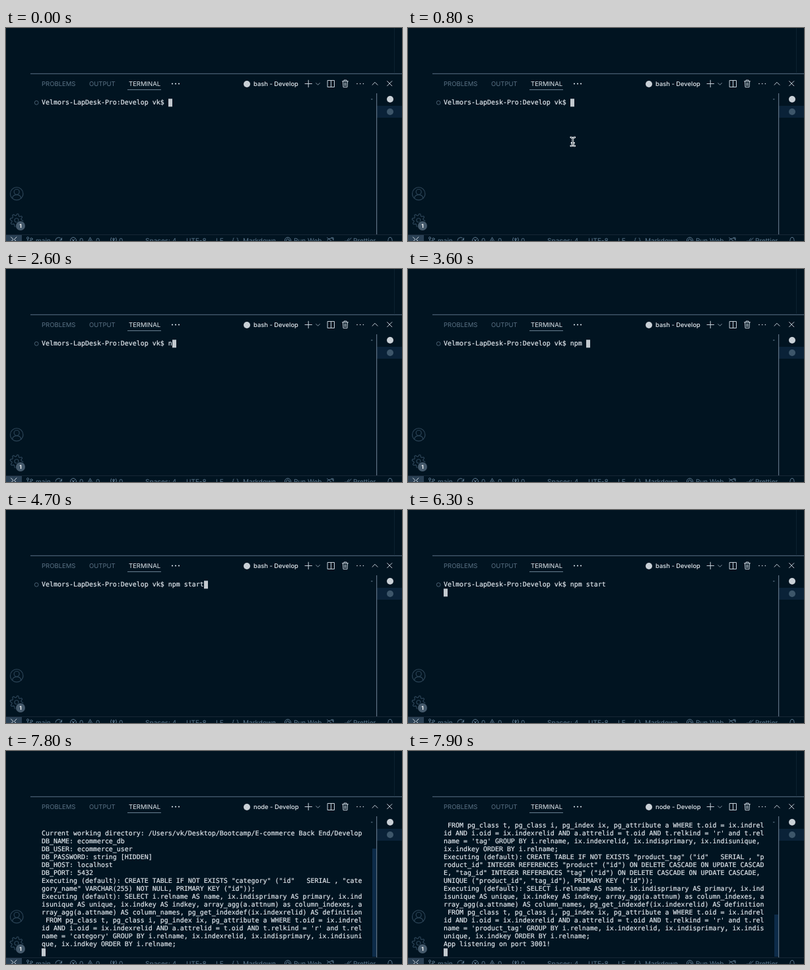
Recreate the animation shown at these times as an HTML page. Size 600 px wide and 323 px high, loop 8 s.

```html
<!DOCTYPE html>
<html lang="en">
<head>
<meta charset="utf-8">
<title>Terminal session</title>
<style>
  html, body { margin: 0; width: 100%; height: 100%; overflow: hidden; background: #011421; text-rendering: geometricPrecision; }
  svg { position: absolute; left: 0; top: 0; font-family: Inter, sans-serif; }
  .line { fill: none; stroke: currentColor; stroke-linecap: round; stroke-linejoin: round; }
  .tabs { font-size: 9.5px; }
  .status { font-size: 10px; color: #5c788e; }
  #screen {
    position: absolute; left: 54px; top: 108px; margin: 0; color: #e2e7ed;
    font: 9.966px/12px "DejaVu Sans Mono", monospace; font-variant-ligatures: none;
    -webkit-text-stroke: .2px #e2e7ed;
  }
</style>
</head>
<body>
<svg width="600" height="323" viewBox="0 0 600 323">
  <!-- panel frame -->
  <path d="M37 69.3H600" stroke="#5b7086"/>
  <path d="M588.5 0V69" stroke="#0c2231"/>
  <path d="M0 313.5H600" stroke="#172635"/>
  <rect x="562" y="118" width="38" height="18" fill="#0a2238"/>
  <path d="M561.7 99V313" stroke="#73879a"/>

  <!-- panel tabs -->
  <g class="tabs" fill="#5a7184">
    <text x="54" y="88">PROBLEMS</text>
    <text x="126" y="88">OUTPUT</text>
    <text x="186" y="88" fill="#e2e7ed">TERMINAL</text>
    <text id="title" x="375" y="88" font-size="9.4" font-weight="500" fill="#e2e7ed"></text>
  </g>
  <path d="M184 93.6H235" stroke="#6d8496"/>
  <g fill="#d8dfe8">
    <circle cx="252" cy="84.5" r="1.1"/><circle cx="257" cy="84.5" r="1.1"/><circle cx="262" cy="84.5" r="1.1"/>
    <circle cx="532" cy="84.5" r=".8"/><circle cx="536.7" cy="84.5" r=".8"/><circle cx="541.4" cy="84.5" r=".8"/>
  </g>
  <g fill="#c9d0d6">
    <circle cx="365" cy="85" r="5"/>
    <circle cx="582" cy="108" r="5"/>
    <circle cx="582" cy="127" r="5" fill="#3d566a"/>
  </g>
  <g class="line" color="#c8d1da">
    <path d="M453 84.5h10.5M458.2 79.2v10.5"/>
    <path d="M469.8 83.5l2.8 2.8 2.8-2.8" stroke="#8496a5"/>
    <path d="M487.5 79.5h10v10h-10zM492.5 79.5v10"/>
    <path d="M509.5 80.8h9M512 80.5v-1.5h4v1.5M510.5 81l.5 8.7h6l.5-8.7M513 83v4.5M515 83v4.5"/>
    <path d="M555 86.3l4-4 4 4M577.6 80.6l7.2 7.2M584.8 80.6l-7.2 7.2"/>
  </g>

  <!-- activity bar -->
  <g class="line" color="#2c4457" stroke-width="1.2">
    <circle cx="16.2" cy="251.2" r="9.7"/>
    <circle cx="16.2" cy="248.5" r="4"/>
    <path d="M9.6 258.2C10.5 251 22 251 22.8 258.2"/>
    <circle cx="16" cy="291.5" r="3"/>
    <path id="gear"/>
  </g>
  <circle cx="22" cy="300" r="7.8" fill="#011421"/>
  <circle cx="22" cy="300" r="7" fill="#44596b"/>
  <text x="22" y="303" font-size="8" font-weight="700" text-anchor="middle" fill="#fff">1</text>

  <!-- status bar -->
  <rect y="314" width="24" height="9" fill="#2a4054"/>
  <path class="line" color="#d0d8e0" d="M7.5 317l3.5 3.5-3.5 3.5M16 317l-3.5 3.5 3.5 3.5"/>
  <g class="status" fill="currentColor">
    <text x="45" y="326">main</text>
    <text x="111" y="326">0</text>
    <text x="136" y="326">0</text>
    <text x="171" y="326">0</text>
    <text x="211" y="326">Spaces: 4</text>
    <text x="273" y="326">UTF-8</text>
    <text x="318" y="326">LF</text>
    <text x="342" y="326">{ }</text>
    <text x="359" y="326">Markdown</text>
    <text x="436" y="326">Run Web</text>
    <text x="526" y="326">Prettier</text>
    <g class="line">
      <circle cx="33" cy="318.5" r="1.6"/><circle cx="38.5" cy="320" r="1.6"/><path d="M33 320v3M38 322l-5 2"/>
      <path d="M75 322a4.6 4.6 0 0 1 9-1M84.5 318.5v3h-3"/>
      <circle cx="102" cy="322" r="4.5"/><path d="M100 320l4 4M104 320l-4 4"/>
      <path d="M123 326l4.5-8.5 4.5 8.5M127.5 321v2"/>
      <path d="M159.5 318a5 5 0 0 0 0 6M166.5 318a5 5 0 0 1 0 6M163 321l-2 5M163 321l2 5"/>
      <circle cx="163" cy="320" r="1.2"/>
      <circle cx="427" cy="322" r="4.6"/><circle cx="427" cy="322" r="2.3"/>
      <path d="M486.5 318l9 7M487 322a3 3 0 0 1 4-2.5 3 3 0 0 1 5 2M493 318h3v3"/>
      <path d="M514 322.5l1.5 1.5 4-5M518 323.5l5-5"/>
      <path d="M578.5 324c1-2 0-6.5 3.5-6.5s2.5 4.5 3.5 6.5"/>
    </g>
  </g>

  <!-- terminal -->
  <rect x="553" y="107" width="2.5" height="2" fill="#34495a"/>
  <circle id="mark" cx="46.2" cy="113.3" r="2.9" fill="none" stroke="#4a6072"/>
  <rect id="scrollbar" x="555" width="6" fill="#0c2b49"/>
  <rect id="caret" width="6" height="12" fill="#c3c9cf"/>
  <g id="mouse" class="line">
    <path id="beam" d="M-3 -6.5Q0 -6.5 0 -4Q0 -6.5 3 -6.5M0 -4V4M-3 6.5Q0 6.5 0 4Q0 6.5 3 6.5M-1.8 2H1.8" stroke="#e4e8ec" stroke-width="2.8"/>
    <path d="M0 -5V5M-2.5 -6.5H-1.5M1.5 -6.5H2.5M-2.5 6.5H-1.5M1.5 6.5H2.5" stroke="#06111a" stroke-width=".9"/>
  </g>
</svg>
<pre id="screen"></pre>

<script>
const LOOP = 8000, STEP = 100, COLS = 81, ROWS = 17;
const el = id => document.getElementById(id);

const prompt = 'Velmors-LapDesk-Pro:Develop vk$ ';
const command = 'npm start';
const keyTimes = [2600, 3100, 3300, 3600, 4000, 4200, 4400, 4500, 4700];

const createTable = (name, columns) =>
  `Executing (default): CREATE TABLE IF NOT EXISTS "${name}" ("id"   SERIAL , ${columns}, PRIMARY KEY ("id"));\n`;
const selectIndexes = name =>
  'Executing (default): SELECT i.relname AS name, ix.indisprimary AS primary, ix.indisunique AS unique, ' +
  'ix.indkey AS indkey, array_agg(a.attnum) as column_indexes, array_agg(a.attname) AS column_names, ' +
  'pg_get_indexdef(ix.indexrelid) AS definition FROM pg_class t, pg_class i, pg_index ix, pg_attribute a ' +
  'WHERE t.oid = ix.indrelid AND i.oid = ix.indexrelid AND a.attrelid = t.oid AND t.relkind = \'r\' ' +
  `and t.relname = '${name}' GROUP BY i.relname, ix.indexrelid, ix.indisprimary, ix.indisunique, ` +
  'ix.indkey ORDER BY i.relname;\n';
const foreignKey = table =>
  `"${table}_id" INTEGER REFERENCES "${table}" ("id") ON DELETE CASCADE ON UPDATE CASCADE`;

const output = [
  [6300, '\n'],
  [6800, '\n> module-13-challenge-orm@1.0.0 start\n> node server.js\n\n'],
  [7600, 'Current working directory: /Users/vk/Desktop/Bootcamp/E-commerce Back End/Develop\n' +
         'DB_NAME: ecommerce_db\nDB_USER: ecommerce_user\nDB_PASSWORD: string [HIDDEN]\n' +
         'DB_HOST: localhost\nDB_PORT: 5432\n'],
  [7800, createTable('category', '"category_name" VARCHAR(255) NOT NULL') + selectIndexes('category')],
  [7900, selectIndexes('tag') +
         createTable('product_tag', `${foreignKey('product')}, ${foreignKey('tag')}, UNIQUE ("product_id", "tag_id")`) +
         selectIndexes('product_tag') + 'App listening on port 3001!\n'],
];

const wrap = line => line.match(new RegExp(`.{1,${COLS}}`, 'g')) || [''];

function terminalRows(t) {
  const typed = command.slice(0, keyTimes.filter(k => k <= t).length);
  const printed = output.filter(([start]) => start <= t).map(([, text]) => text).join('');
  return (prompt + typed + printed).split('\n').flatMap(wrap);
}

function mousePosition(t) {
  if (t <= 1200) {
    const p = 1 - (1 - (t - 400) / 800) ** 1.3;
    return [216.5 + 56 * p, 235 - 105.5 * p];
  }
  return t < 1400 ? [273.5, 121] : t < 1500 ? [274.5, 116.5] : [274, 118];
}

function gearPath() {
  const points = [];
  for (let i = 0; i < 32; i++) {
    const angle = (i + 0.5) * Math.PI / 16, r = i % 4 < 2 ? 9.8 : 7.2;
    points.push(`${16 + r * Math.cos(angle)} ${291.5 + r * Math.sin(angle)}`);
  }
  return `M${points.join('L')}Z`;
}

function render(t) {
  const all = terminalRows(t), rows = all.slice(-ROWS);
  el('screen').textContent = rows.join('\n');
  el('title').textContent = (t < 6600 ? 'bash' : 'node') + ' - Develop';

  el('caret').setAttribute('x', 54 + 6 * rows.at(-1).length);
  el('caret').setAttribute('y', 107.3 + 12 * (rows.length - 1));

  const scrolled = all.length > ROWS;
  el('mark').style.display = scrolled ? 'none' : '';
  el('scrollbar').style.display = scrolled ? '' : 'none';
  const top = t < 7900 ? 148 : 248;
  el('scrollbar').setAttribute('y', top);
  el('scrollbar').setAttribute('height', 312 - top);

  const mouseShown = t >= 400 && t < 2500;
  el('mouse').style.display = mouseShown ? '' : 'none';
  if (mouseShown) el('mouse').setAttribute('transform', `translate(${mousePosition(t)})`);
}

function tick() {
  render(Math.floor(performance.now() % LOOP / STEP) * STEP);
  requestAnimationFrame(tick);
}

el('gear').setAttribute('d', gearPath());
tick();
</script>
</body>
</html>
```
